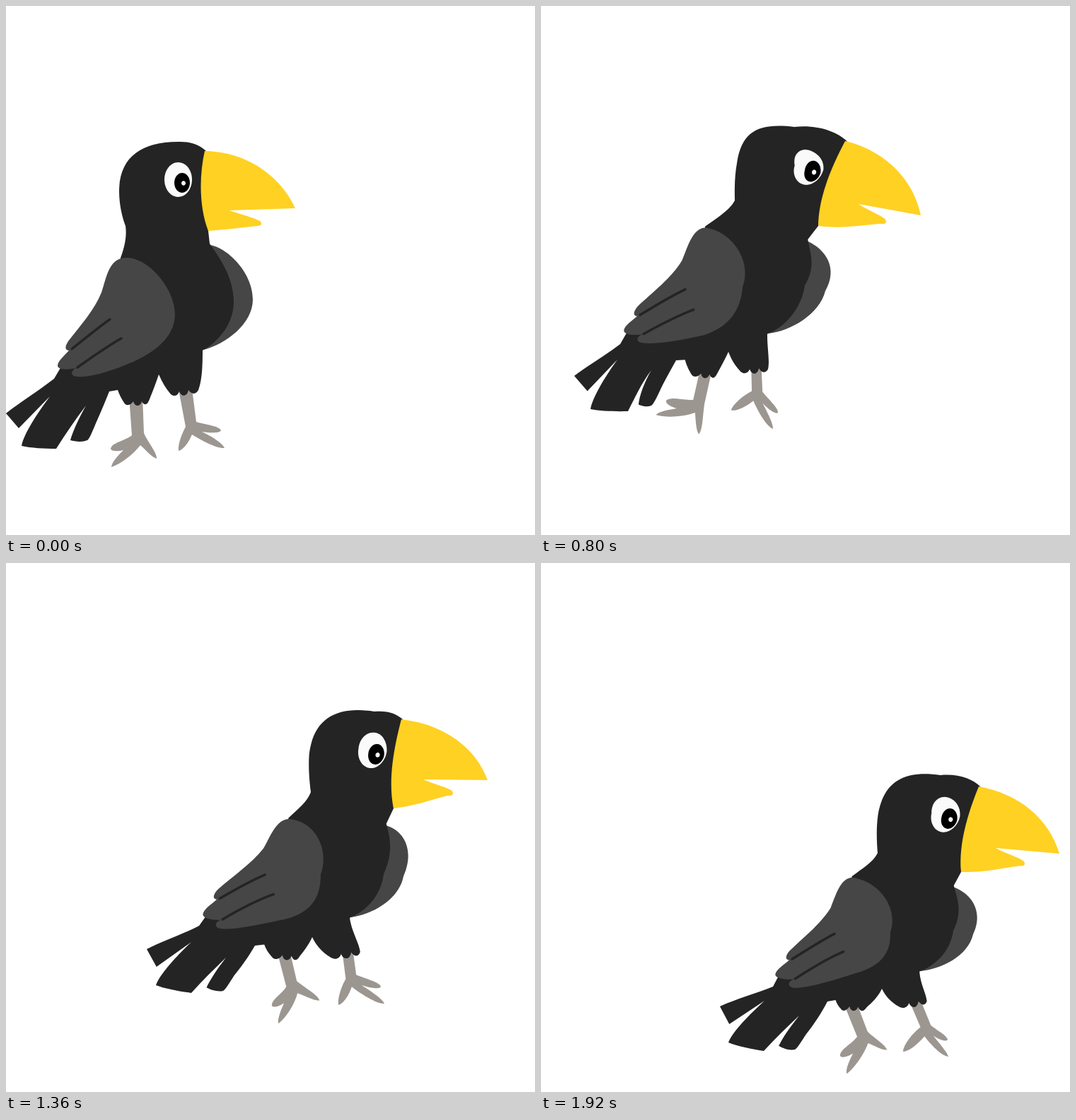
An HTML page that plays this animation: 748x748 px, repeating every 2880 ms.

```html
<!DOCTYPE html>
<html lang="en">
<head>
<meta charset="utf-8">
<title>Hopping crow</title>
<style>
html, body { margin: 0; height: 100%; overflow: hidden; background: #fff; }
svg { display: block; width: 100vw; height: 100vh; }
</style>
</head>
<body>
<svg id="stage" viewBox="0 0 748 748"></svg>
<script>
const LOOP = 2880, STEP = 40;
const KEYS = [400, 520, 800, 1120, 1360, 1680, 1920];
// Vertical speed in px/ms at the keys of the flight
const FLIGHT = { 2: -0.28, 3: 0.28, 4: 0.38 };

// Each row is one pin: its x, y in the seven key poses
const head = [
  [169,311, 176,317, 274,275, 375,262, 431,324, 497,415, 476,410], // nape
  [243,192, 250,205, 358,171, 466,140, 521,210, 565,321, 565,300], // crown
  [243,245, 263,259, 379,228, 458,196, 518,265, 593,380, 572,356], // eye
  [281,205, 308,224, 430,191, 495,150, 559,221, 644,350, 619,316], // beak root, top
  [286,318, 291,335, 392,311, 494,275, 548,347, 600,463, 594,437], // beak root, bottom
  [316,289, 331,313, 449,280, 532,234, 590,306, 647,440, 643,403], // mouth corner
  [409,286, 421,324, 537,296, 624,229, 681,307, 733,469, 733,411], // upper tip
  [361,307, 371,338, 488,305, 577,250, 632,325, 682,471, 684,425]  // lower tip
];
const wings = [
  [170,356, 164,359, 240,315, 355,302, 407,363, 453,445, 447,446],
  [239,435, 230,438, 285,397, 401,378, 445,440, 483,522, 494,522],
  [84,486, 75,487, 131,437, 245,417, 293,474, 349,556, 346,560],
  [74,512, 65,514, 118,462, 230,442, 279,500, 336,582, 332,585],
  [93,522, 84,524, 136,474, 247,458, 296,514, 355,594, 350,598],
  [288,339, 288,352, 375,333, 486,303, 536,372, 581,480, 582,459],
  [349,415, 342,425, 402,403, 518,380, 562,443, 598,535, 611,525],
  [280,486, 274,490, 322,463, 437,443, 488,501, 530,583, 537,577],
  [322,418, 315,426, 373,395, 490,375, 534,440, 573,518, 583,520]  // chest
];
const tail = [
  [68,527, 62,531, 112,478, 222,456, 273,513, 330,597, 328,599],
  [0,576, -1,586, 47,523, 142,482, 199,546, 266,646, 253,627],
  [62,552, 56,557, 108,500, 210,478, 262,536, 325,621, 316,619],
  [22,622, 25,628, 70,570, 149,532, 212,597, 289,690, 265,678],
  [71,626, 77,629, 123,573, 199,548, 262,608, 341,693, 315,690],
  [113,565, 107,567, 156,515, 257,500, 311,558, 374,635, 365,640],
  [115,614, 111,615, 156,565, 248,549, 307,605, 375,684, 359,688],
  [146,545, 142,546, 191,501, 298,483, 352,541, 409,620, 405,620],
  [216,521, 214,526, 265,489, 375,467, 433,529, 483,609, 482,602]  // crotch
];
const legL = [
  [185,562, 184,567, 231,523, 336,499, 396,558, 445,638, 441,630], // hip
  [186,612, 186,611, 220,565, 331,541, 405,601, 457,672, 456,672], // ankle
  [148,626, 148,626, 177,558, 287,538, 376,626, 421,695, 423,697],
  [150,651, 150,651, 164,578, 278,561, 386,650, 431,719, 433,721],
  [212,639, 212,639, 223,604, 340,577, 442,618, 488,690, 488,688]
];
const legR = [
  [252,548, 253,553, 302,517, 411,497, 482,556, 533,632, 528,625],
  [263,597, 263,597, 305,550, 411,531, 489,590, 541,662, 545,660],
  [245,628, 244,627, 270,571, 385,558, 471,624, 508,683, 513,690],
  [304,600, 304,600, 335,575, 449,549, 530,599, 573,684, 575,674],
  [309,625, 308,626, 328,598, 447,574, 535,623, 568,707, 576,698]
];
const torso = [...head, ...wings, ...tail, legL[0], legR[0]];

function oval(x, y, rx, ry) {
  const k = 0.552, a = rx * k, b = ry * k;
  return `M${x - rx} ${y}C${x - rx} ${y - b} ${x - a} ${y - ry} ${x} ${y - ry}` +
    `C${x + a} ${y - ry} ${x + rx} ${y - b} ${x + rx} ${y}` +
    `C${x + rx} ${y + b} ${x + a} ${y + ry} ${x} ${y + ry}` +
    `C${x - a} ${y + ry} ${x - rx} ${y + b} ${x - rx} ${y}Z`;
}

const BLACK = '#242424', GREY = '#464646', LEG = '#9c9691';
const shapes = [];
function add(pins, color, d, line) {
  const el = document.createElementNS('http://www.w3.org/2000/svg', 'path');
  el.setAttribute('fill', line ? 'none' : color);
  if (line) {
    el.setAttribute('stroke', color);
    el.setAttribute('stroke-width', line);
    el.setAttribute('stroke-linecap', 'round');
  }
  stage.append(el);
  shapes.push({ el, pins, d });
}

// Far wing and legs
add(torso, GREY, 'M288 338C310 340 349 375 349 415C349 450 310 478 280 486L290 440L296 380Z');
add(legL, LEG, 'M174 552L193 552L195 604C200 616 214 632 213 640C206 638 196 626 190 621' +
  'C180 634 163 647 149 652C149 645 160 634 166 628C158 630 149 630 148 626C150 617 168 615 178 607Z');
add(legR, LEG, 'M244 542L263 541L269 588C282 592 302 594 304 600C303 604 290 604 277 602' +
  'C290 608 306 618 309 625C298 626 276 614 263 606C258 618 250 628 244 629C243 620 248 606 254 595Z');
// Head, body, thighs and tail
add(torso, BLACK, 'M169 311C164 298 160 280 160 262C160 215 190 192 243 192C262 191 274 197 283 205' +
  'C278 240 278 285 286 318L288 336C296 348 322 380 322 418C322 450 300 475 278 487' +
  'C278 510 277 530 272 543C269 549 263 550 258 543C256 553 248 553 245 545' +
  'C243 551 238 553 233 549C226 541 221 532 216 521C212 533 207 546 203 556' +
  'C200 564 196 566 192 559C190 567 182 567 180 559C176 565 170 566 167 561' +
  'C163 555 160 549 158 543L146 545C140 560 133 577 127 590C122 602 118 612 115 614' +
  'C108 617 98 616 91 614C95 600 103 583 113 565C98 585 84 605 71 626' +
  'C55 626 35 625 22 622C25 605 45 575 62 552L18 597L0 576C20 560 45 545 68 527' +
  'L78 510L120 470L160 390L162 356C168 340 171 325 169 311Z');
// Near wing
add(torso, GREY, 'M170 356C200 355 238 398 239 435C239 462 220 485 180 503C150 516 118 526 100 524' +
  'C91 523 91 516 99 512C84 515 74 514 73 509C73 502 82 495 89 487C82 487 84 480 88 474' +
  'C105 452 125 430 135 405C142 385 145 356 170 356Z');
add(torso, BLACK, 'M147 443C135 451 112 470 93 485', 3.5);
add(torso, BLACK, 'M163 470C145 480 125 494 101 511', 3.5);
// Beak and eye
add(torso, '#ffd122', 'M281 205C340 206 388 240 409 286L316 289C330 294 350 299 359 304' +
  'C363 308 361 311 355 311C330 314 310 316 286 318C273 285 273 240 281 205Z');
add(torso, '#fafafa', oval(243.5, 245.5, 19.5, 24.5));
add(torso, '#000', oval(249, 250, 11, 14));
add(torso, '#fafafa', oval(251, 250.5, 3, 3.2));

// Value of one pin coordinate (axis 0 or 1) at time t
function track(pin, axis, t) {
  const last = KEYS.length - 1, at = i => pin[2 * i + axis];
  if (t < KEYS[1]) return at(0);
  if (t >= KEYS[last]) return at(last);
  const slope = (a, b) => (at(b) - at(a)) / (KEYS[b] - KEYS[a]);
  const speed = i => {
    if (i === 1) return slope(0, 1);
    if (i === last) return 0;
    if (!axis) return slope(i - 1, i + 1);
    return FLIGHT[i] ?? slope(i, i + 1);
  };
  let i = 1;
  while (t >= KEYS[i + 1]) i++;
  const span = KEYS[i + 1] - KEYS[i], s = (t - KEYS[i]) / span, r = 1 - s;
  return r * r * (1 + 2 * s) * at(i) + s * s * (3 - 2 * s) * at(i + 1) +
    s * r * span * (r * speed(i) - s * speed(i + 1));
}

// Moves a point with the pins: weighted best turn, scale and shift
function warp(x, y, pins) {
  let sum = 0, px = 0, py = 0, qx = 0, qy = 0;
  const weights = pins.map(p => {
    const w = 1 / ((x - p.x) ** 2 + (y - p.y) ** 2 + 0.01) ** 2;
    sum += w;
    px += w * p.x; py += w * p.y;
    qx += w * p.X; qy += w * p.Y;
    return w;
  });
  px /= sum; py /= sum; qx /= sum; qy /= sum;
  let a = 0, b = 0, m = 0;
  pins.forEach((p, i) => {
    const w = weights[i], u = p.x - px, v = p.y - py, U = p.X - qx, V = p.Y - qy;
    a += w * (u * U + v * V);
    b += w * (u * V - v * U);
    m += w * (u * u + v * v);
  });
  a /= m; b /= m;
  const dx = x - px, dy = y - py;
  return [qx + a * dx - b * dy, qy + b * dx + a * dy];
}

function draw(t) {
  const pose = new Map();
  for (const set of [torso, legL, legR])
    pose.set(set, set.map(p => ({ x: p[0], y: p[1], X: track(p, 0, t), Y: track(p, 1, t) })));
  for (const { el, pins, d } of shapes)
    el.setAttribute('d', d.replace(/(-?[\d.]+) (-?[\d.]+)/g, (_, x, y) =>
      warp(+x, +y, pose.get(pins)).map(n => n.toFixed(2)).join(' ')));
}

let start, shown;
function tick(now) {
  start ??= now;
  const t = Math.floor((now - start) % LOOP / STEP) * STEP;
  if (t !== shown) draw(shown = t);
  requestAnimationFrame(tick);
}
draw(0);
requestAnimationFrame(tick);
</script>
</body>
</html>
```
